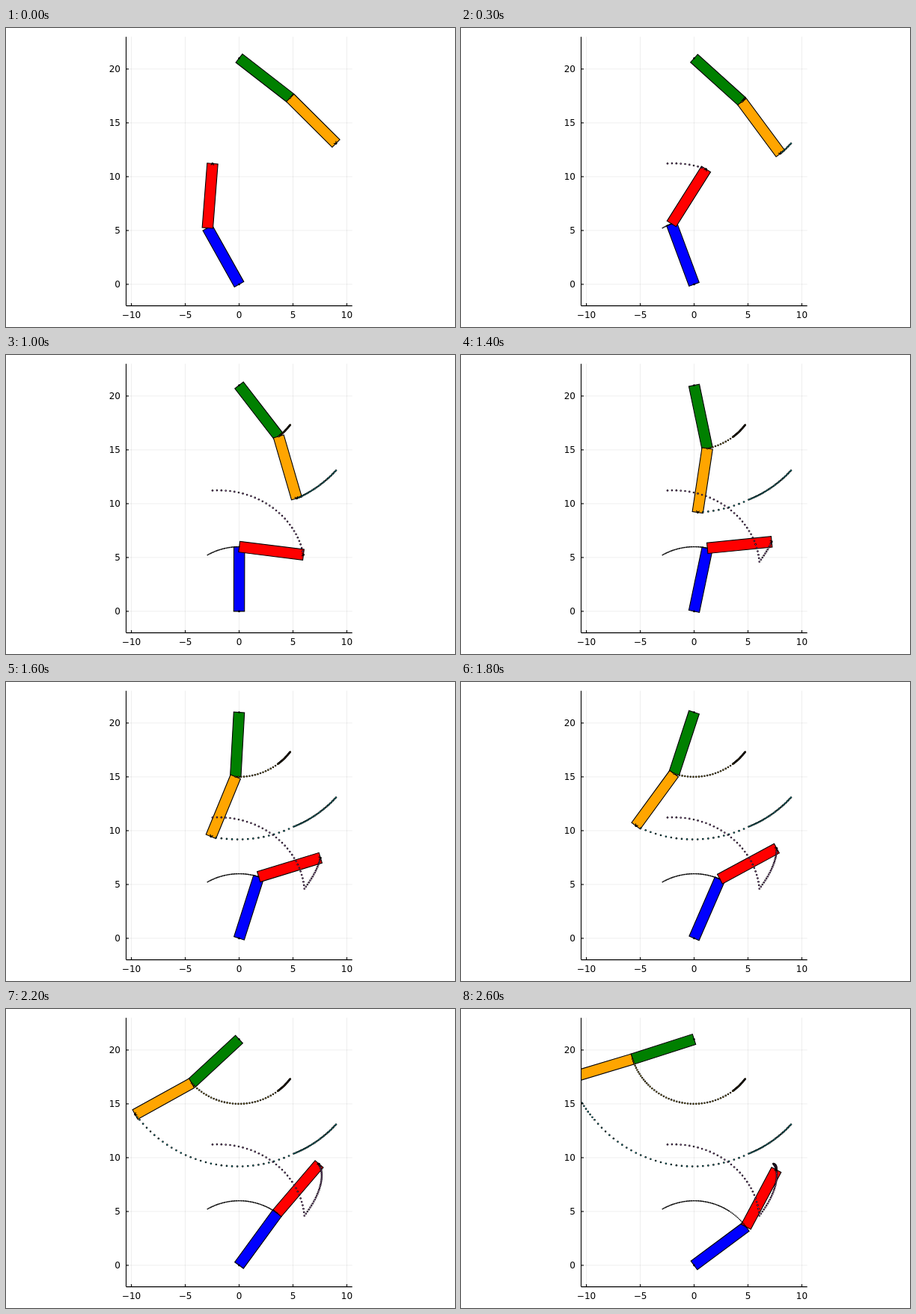
An HTML page with a canvas for the animation above (2.7 s loop, 600 by 400 pixels).

```html
<!DOCTYPE html>
<html>
<head>
<meta charset="utf-8">
<style>
html, body { margin: 0; width: 600px; height: 400px; overflow: hidden; background: #fff; }
canvas { display: block; }
</style>
</head>
<body>
<canvas id="stage" width="600" height="400"></canvas>
<script>
const ctx = document.getElementById('stage').getContext('2d');
const FRAMES = 27, FRAME_MS = 100, STEPS_PER_FRAME = 3;
const UNIT = 14.4, LENGTH = 6;
const X = x => 311.5 + x * UNIT;
const Y = y => 342.9 - y * UNIT;
const BOX = { left: 160.5, top: 11.7, right: 462.7, bottom: 371.6 };

// Joint angles in degrees: lower arm, its elbow, upper arm, its elbow.
const POSES = [
  { step: 0, angles: [119.2, -33.6, -37.8, -7.1] },
  { step: 32, angles: [87.9, -101.2, -53.3, -22.4] },
  { step: 64, angles: [56.8, -9.4, -133, -16] },
  { step: 78, angles: [36.6, 25.4, -162.1, -1.2] }
];
const ARMS = [
  { base: [0, 0], joint: 0, colors: ['blue', 'red'], dots: ['#000', '#c271d2'] },
  { base: [0, 21], joint: 2, colors: ['green', 'orange'], dots: ['#ac8e18', '#00aaae'] }
];

function anglesAt(step) {
  const i = Math.max(1, POSES.findIndex(p => p.step >= step));
  const a = POSES[i - 1], b = POSES[i];
  const k = (step - a.step) / (b.step - a.step);
  return a.angles.map((v, n) => (v + (b.angles[n] - v) * k) * Math.PI / 180);
}

function reach([x, y], angle) {
  return [x + LENGTH * Math.cos(angle), y + LENGTH * Math.sin(angle)];
}

function armAt(arm, step) {
  const angles = anglesAt(step);
  const first = angles[arm.joint], second = first + angles[arm.joint + 1];
  const elbow = reach(arm.base, first);
  return { first, second, elbow, tip: reach(elbow, second) };
}

function line(x1, y1, x2, y2) {
  ctx.beginPath();
  ctx.moveTo(x1, y1);
  ctx.lineTo(x2, y2);
  ctx.stroke();
}

function bar([x, y], angle, color) {
  ctx.save();
  ctx.translate(X(x), Y(y));
  ctx.rotate(-angle);
  ctx.beginPath();
  ctx.rect(0, -UNIT / 2, LENGTH * UNIT, UNIT);
  ctx.fillStyle = color;
  ctx.fill();
  ctx.stroke();
  ctx.restore();
}

function disc([x, y], radius, color) {
  ctx.beginPath();
  ctx.arc(X(x), Y(y), radius, 0, 2 * Math.PI);
  ctx.fillStyle = color;
  ctx.fill();
}

function dot(point, color) {
  disc(point, color === '#000' ? 0.85 : 1.3, '#000');
  if (color !== '#000') disc(point, 0.6, color);
}

function tipMark([x, y], angle) {
  ctx.save();
  ctx.translate(X(x), Y(y));
  ctx.rotate(-angle);
  line(-2.2, -2.2, 1, 1);
  line(-2.2, 2.2, 1, -1);
  ctx.restore();
}

function drawGrid() {
  ctx.lineWidth = 1;
  ctx.strokeStyle = 'rgba(0,0,0,0.065)';
  for (let v = -10; v <= 10; v += 5) line(X(v), BOX.top, X(v), BOX.bottom);
  for (let v = 0; v <= 20; v += 5) line(BOX.left, Y(v), BOX.right, Y(v));
}

function drawAxes() {
  ctx.strokeStyle = ctx.fillStyle = '#000';
  ctx.lineWidth = 1.1;
  ctx.font = '12px "DejaVu Sans", sans-serif';
  line(BOX.left, BOX.top, BOX.left, BOX.bottom);
  line(BOX.left, BOX.bottom, BOX.right, BOX.bottom);
  ctx.textAlign = 'center';
  for (let v = -10; v <= 10; v += 5) {
    line(X(v), BOX.bottom, X(v), BOX.bottom - 3.5);
    ctx.fillText(String(v).replace('-', '\u2212'), X(v), 387.5);
  }
  ctx.textAlign = 'right';
  for (let v = 0; v <= 20; v += 5) {
    line(BOX.left, Y(v), BOX.left + 3.5, Y(v));
    ctx.fillText(v, 153, Y(v) + 4.4);
  }
}

function drawArms(step) {
  ctx.save();
  ctx.beginPath();
  ctx.rect(BOX.left, BOX.top, BOX.right - BOX.left, BOX.bottom - BOX.top);
  ctx.clip();
  ctx.strokeStyle = '#000';
  ctx.lineWidth = 1.1;
  for (const arm of ARMS) {
    const pose = armAt(arm, step);
    bar(arm.base, pose.first, arm.colors[0]);
    bar(pose.elbow, pose.second, arm.colors[1]);
  }
  for (const arm of ARMS) {
    disc(arm.base, 1.3, '#000');
    for (let s = 0; s <= step; s++) {
      const { elbow, tip } = armAt(arm, s);
      dot(elbow, arm.dots[0]);
      dot(tip, arm.dots[1]);
    }
    const { tip, second } = armAt(arm, step);
    tipMark(tip, second);
  }
  ctx.restore();
}

function render() {
  const frame = Math.floor(performance.now() / FRAME_MS) % FRAMES;
  ctx.fillStyle = '#fff';
  ctx.fillRect(0, 0, 600, 400);
  drawGrid();
  drawArms(frame * STEPS_PER_FRAME);
  drawAxes();
  requestAnimationFrame(render);
}
render();
</script>
</body>
</html>
```
